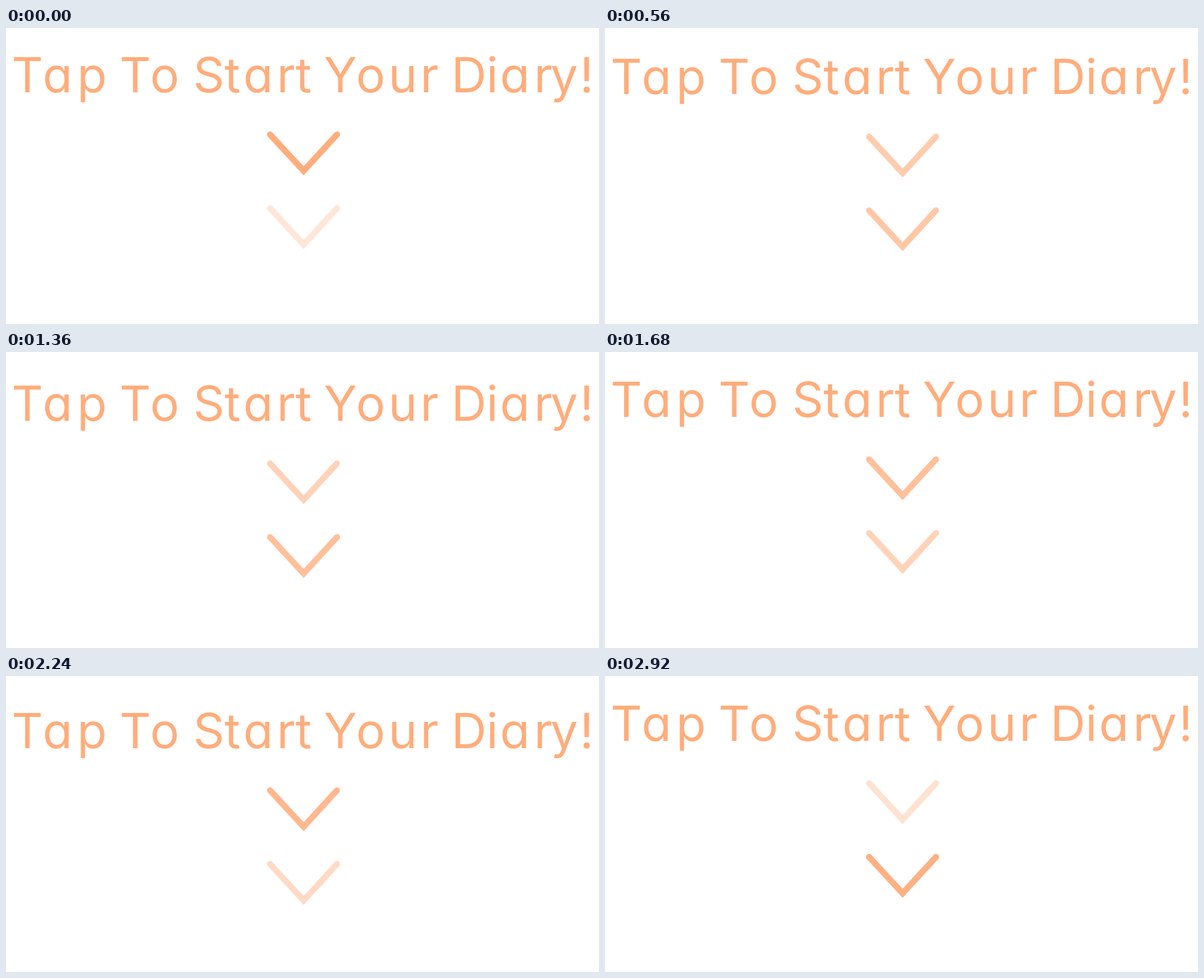
Recreate the animation shown at these times as an HTML page. Size 1058x529 px, loop 3 s.

```html
<!DOCTYPE html>
<html lang="en">
<head>
<meta charset="utf-8">
<title>Diary prompt</title>
<style>
  html, body { margin: 0; width: 100%; height: 100%; overflow: hidden; background: #fff; }
  svg { display: block; width: 100%; height: 100%; }
  text { font: 400 87px Inter, "Open Sans", sans-serif; font-feature-settings: "cv11"; fill: #ffad7c; text-anchor: middle; }
  polyline { fill: none; stroke: #ffad7c; stroke-width: 11; stroke-linecap: round; stroke-miterlimit: 8; }
</style>
</head>
<body>
<svg viewBox="0 0 1058 529">
  <g id="group">
    <text y="114.5" x="38 92 153.5 195 230.5 283 325 362 404 450 499.5 531 560 596.5 650.5 708 755.5 785 826 867.5 908 958.5 996 1036">Tap To Start Your Diary!</text>
    <polyline id="upper" points="471.2,190.4 531,255.3 590.5,190.4"/>
    <polyline id="lower" points="471.2,322.1 531,387 590.5,322.1"/>
  </g>
</svg>
<script>
  const [group, upper, lower] = ['group', 'upper', 'lower'].map(id => document.getElementById(id));

  // Vertical drift: [seconds, offset, slope]
  const drift = [
    [0, 0, -45], [0.23, -6, 0], [0.542, 3.9, 33], [0.93, 19.8, 0], [1.333, 8.8, -28],
    [1.53, 0.6, 0], [2.208, 14, 22], [2.38, 16.8, 0], [2.917, 1.3, -34]
  ];

  function hermite(keys, t) {
    const i = Math.max(1, keys.findIndex(k => k[0] >= t));
    const [t0, y0, m0] = keys[i - 1], [t1, y1, m1] = keys[i];
    const h = t1 - t0, u = (t - t0) / h, v = 1 - u;
    return y0 * v * v * (1 + 2 * u) + y1 * u * u * (3 - 2 * u) + h * u * v * (m0 * v - m1 * u);
  }

  // 24 fps motion shown in 40 ms steps, so about once a second a step repeats
  function sceneTime(ms) {
    const step = Math.floor(ms % 3000 / 40);
    return (step - Math.floor((step + 23.8) / 24.35)) / 24;
  }

  function draw(now) {
    const t = sceneTime(now);
    const fade = Math.abs(1 - t % 2);
    group.setAttribute('transform', `translate(0 ${hermite(drift, t)})`);
    upper.setAttribute('opacity', 0.3 + 0.7 * fade);
    lower.setAttribute('opacity', 1 - 0.7 * fade);
    requestAnimationFrame(draw);
  }
  draw(0);
</script>
</body>
</html>
```
